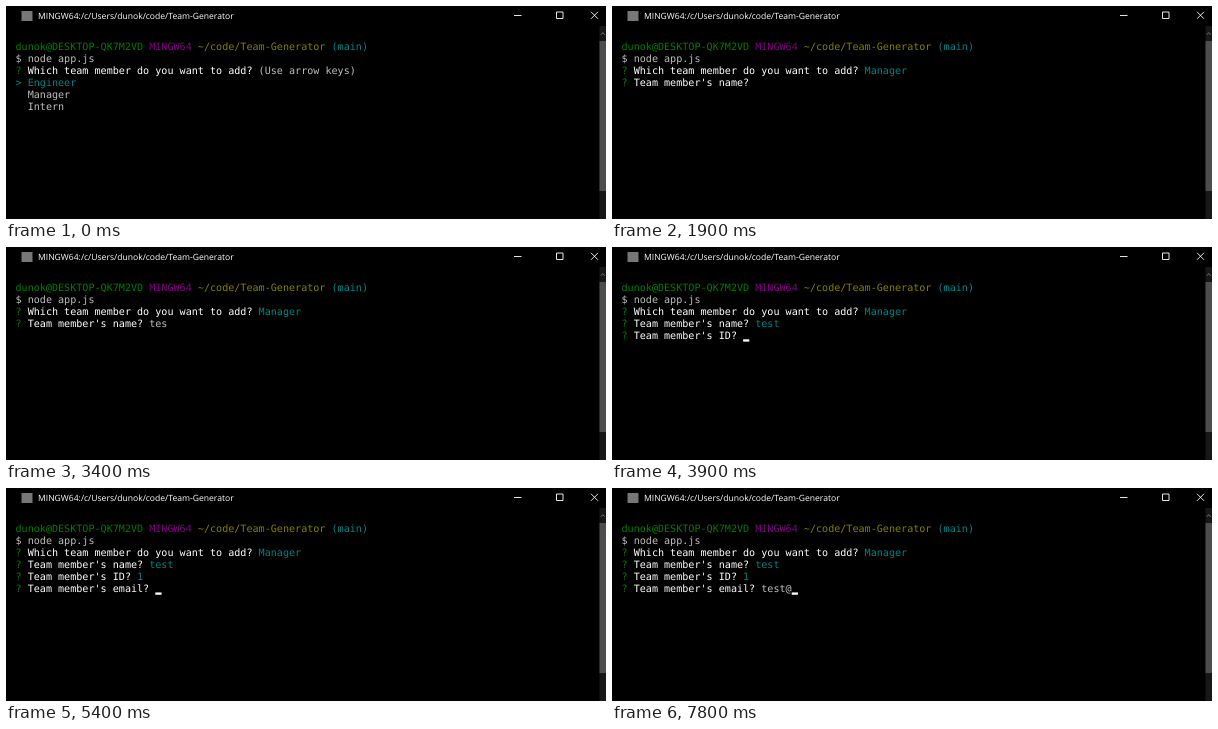
Recreate the animation shown at these times as an HTML page. Size 600 by 213 pixels, loop 8000 ms.

```html
<!DOCTYPE html>
<html lang="en">
<head>
<meta charset="utf-8">
<title>Terminal prompt</title>
<style>
  html, body { margin: 0; width: 100%; height: 100%; overflow: hidden; background: #000; }
  svg { display: block; width: 600px; height: 213px; }
  text { white-space: pre; text-rendering: geometricPrecision; }
  .title { font: 8.58px "Open Sans", "Noto Sans", sans-serif; fill: #fff; }
  #screen { font: 10.1px "DejaVu Sans Mono", "Liberation Mono", monospace; fill: #bfbfbf; }
  .green { fill: #007c00; }
  .purple { fill: #800080; }
  .olive { fill: #808000; }
  .teal { fill: #008282; }
  .white { fill: #fff; }
  .controls { fill: none; stroke: #fff; stroke-width: .9; }
</style>
</head>
<body>
<svg viewBox="0 0 600 213">
  <rect width="600" height="213"/>
  <rect x="15.5" y="5" width="11" height="10" fill="#777"/>
  <text class="title" x="32" y="13">MINGW64:/c/Users/dunok/code/Team-Generator</text>
  <path class="controls" d="M508 9.5h7.5M550.5 6h6.5v6.5h-6.5zM585 5.8l7 7m0-7l-7 7"/>
  <rect x="593.5" y="20" width="6.5" height="193" fill="#171717"/>
  <rect x="593.5" y="35" width="6.5" height="150" fill="#4d4d4d"/>
  <path d="M594.8 28.8l2-2.2l2 2.2" fill="none" stroke="#777" stroke-width=".9"/>
  <g id="screen"></g>
  <rect id="cursor" width="6.2" height="2.3" fill="#fff"/>
</svg>
<script>
  const LOOP = 8000, LEFT = 9.5, TOP = 43.6, CHAR = 6.08, ROW = 12.15;
  const screen = document.getElementById('screen');
  const cursor = document.getElementById('cursor');

  const PICK_MANAGER = 1000;
  const LIST_DONE = 1200;
  const questions = [
    { label: "Team member's name?", from: 1200, done: 3800, text: 'test', keys: [3200, 3300, 3400, 3600] },
    { label: "Team member's ID?", from: 3800, done: 5400, text: '1', keys: [5200] },
    { label: "Team member's email?", from: 5400, done: Infinity, text: 'test@', keys: [7000, 7100, 7200, 7400, 7800] }
  ];
  // Times at which the cursor is lit, as [on, off].
  const lit = [[1200, 1500], [2000, 2400], [2900, 3400], [3600, 4500], [5000, 5600], [6100, 6600], [7000, 8000]];

  const span = (color, text) => `<tspan class="${color}">${text}</tspan>`;
  const ask = (label, rest) => span('green', '? ') + span('white', label) + ' ' + rest;

  function menu(t) {
    const label = 'Which team member do you want to add?';
    if (t >= LIST_DONE) return [ask(label, span('teal', 'Manager'))];
    const moved = t >= PICK_MANAGER;
    const items = ['Engineer', 'Manager', 'Intern'].map((name, i) =>
      i === Number(moved) ? span('teal', '&gt; ' + name) : '  ' + name);
    return [ask(label, moved ? '' : '(Use arrow keys)'), ...items];
  }

  const header = [
    [span('green', 'dunok@DESKTOP-QK7M2VD'), span('purple', 'MINGW64'),
     span('olive', '~/code/Team-Generator'), span('teal', '(main)')].join(' '),
    '$ node app.js'
  ];

  let shown = '';
  function render(t) {
    const lines = [...header, ...menu(t)];
    let column = 0;
    for (const q of questions) {
      if (t < q.from) break;
      const typed = q.text.slice(0, q.keys.filter(k => t >= k).length);
      lines.push(ask(q.label, t >= q.done ? span('teal', typed) : typed));
      column = 2 + q.label.length + 1 + typed.length;
    }
    const markup = lines.map((line, i) =>
      `<text x="${LEFT}" y="${TOP + i * ROW}">${line}</text>`).join('');
    if (markup !== shown) screen.innerHTML = shown = markup;

    cursor.setAttribute('x', LEFT + column * CHAR);
    cursor.setAttribute('y', TOP + (lines.length - 1) * ROW + .1);
    const on = lit.some(([a, b]) => t >= a && t < b);
    cursor.setAttribute('visibility', on ? 'visible' : 'hidden');
  }

  const start = performance.now();
  function tick() {
    render((performance.now() - start) % LOOP);
    requestAnimationFrame(tick);
  }
  tick();
</script>
</body>
</html>
```
